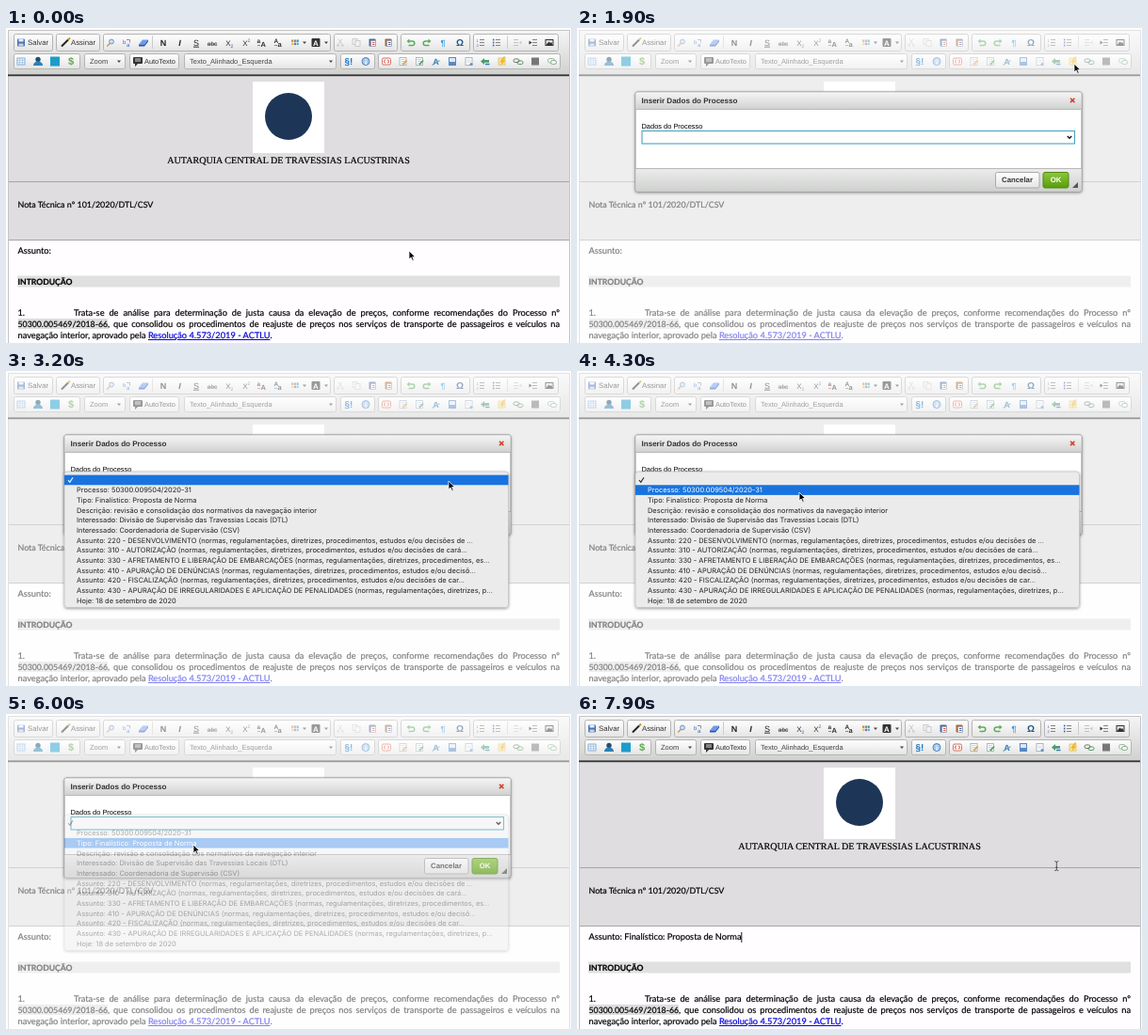
Animation of 600x335 px, one loop 8 s. Source, as an HTML page:

```html
<!DOCTYPE html>
<html lang="pt-BR">
<head>
<meta charset="utf-8">
<title>Editor de documentos</title>
<style>
html, body { margin: 0; width: 100%; height: 100%; overflow: hidden; background: #fff; }
svg { display: block; width: 600px; height: 335px; font-family: "Liberation Sans", Arial, sans-serif; text-rendering: geometricPrecision; }
.doc, .para { font-family: Lato, Calibri, sans-serif; font-size: 9.25px; }
.doc, .serif { stroke: #000; stroke-width: .2px; }
.serif { font-family: "Liberation Serif", "Times New Roman", serif; }
.option { font-family: Inter, sans-serif; }
.para { position: relative; color: #000; line-height: 12px; white-space: nowrap; -webkit-text-stroke: .2px; }
.para div { height: 12px; }
.full { text-align: justify; text-align-last: justify; }
.first { padding-left: 59.5px; }
.num { position: absolute; left: 0; top: 0; }
.ref { font-size: 8.75px; background: #ddd; }
.link { color: #0000e0; text-decoration: underline; }
</style>
</head>
<body>
<svg id="stage" viewBox="0 0 600 335" xmlns="http://www.w3.org/2000/svg">
  <defs>
    <linearGradient id="bar" x2="0" y2="1"><stop stop-color="#f5f5f5"/><stop offset="1" stop-color="#cfd1cf"/></linearGradient>
    <linearGradient id="foot" x2="0" y2="1"><stop stop-color="#ebebeb"/><stop offset="1" stop-color="#cfd1cf"/></linearGradient>
    <linearGradient id="btn" x2="0" y2="1"><stop stop-color="#fff"/><stop offset="1" stop-color="#e4e4e4"/></linearGradient>
    <linearGradient id="go" x2="0" y2="1"><stop stop-color="#8ec63c"/><stop offset="1" stop-color="#579e0b"/></linearGradient>
    <filter id="soft" x="-5%" y="-15%" width="110%" height="135%"><feDropShadow dx="0" dy="1" stdDeviation="1.5" flood-opacity=".4"/></filter>
  </defs>
  <g id="page"></g>
  <rect id="veil" width="600" height="335" fill="#fff" opacity=".5"/>
  <g id="dialog"></g>
  <g id="popup"></g>
  <g id="cursor"></g>
</svg>
<script>
const LOOP = 8000;
const DIALOG_OPEN = 1500, LIST_OPEN = 2800, LIST_FADE = 5850, FADE = 240;
const CHOSEN = 6100, PRESS = 7000, DIALOG_CLOSE = 7350;
const ROW_TOP = 110.6, ROW = 10.65;

const $ = id => document.getElementById(id);
const rect = (x, y, w, h, fill, more = '') => `<rect x="${x}" y="${y}" width="${w}" height="${h}" fill="${fill}" ${more}/>`;
const text = (x, y, size, str, more = '') => `<text x="${x}" y="${y}" font-size="${size}" ${more}>${str}</text>`;
const path = (d, stroke, width = 1, more = '') => `<path d="${d}" fill="none" stroke="${stroke}" stroke-width="${width}" ${more}/>`;
const shape = (d, fill) => `<path d="${d}" fill="${fill}"/>`;
const dot = (x, y, r, fill) => `<circle cx="${x}" cy="${y}" r="${r}" fill="${fill}"/>`;
const at = (x, y, body) => `<g transform="translate(${x} ${y})">${body}</g>`;
const box = (x, y, w, h = 18) => rect(x + .5, y + .5, w, h, 'url(#btn)', 'rx="2" stroke="#b4b4b4"');
const down = (x, y) => shape(`M${x - 2} ${y - 1}h4l-2 2.6z`, '#474747');
const mid = 'text-anchor="middle"', bold = 'font-weight="700"';

// Icons are drawn around their own centre.
const glyph = (str, fill = '#333', size = 9, more = '') => text(0, 3.2, size, str, `${mid} fill="${fill}" ${more}`);
const sheet = (accent, edge = '#9ab') => rect(-3.5, -4, 7, 8, '#fff', `stroke="${edge}" stroke-width=".8"`)
  + path('M-2-2h4M-2 0h4M-2 2h3', '#abc', .7) + path('M0 3.4L4-1', accent, 1.8);
const lines = (c, x = -1) => path(`M${x}-3H4M${x} 0H4M${x} 3H4`, c, .9);
const turn = path('M-2.5-1.5H1.5a2.3 2.3 0 0 1 0 4.6H-2.5', '#5cab5f', 1.5) + shape('M-4.5-1.5l3-2.6v5.2z', '#5cab5f');
const lens = path('M-.8 1L-3.8 4.1', '#c59a5a', 1.5) + `<circle cx="1" cy="-1" r="2.4" fill="#c9e2fa" stroke="#6f92c4"/>`;
const mirror = body => `<g transform="scale(-1 1)">${body}</g>`;
const letters = (a, b, c) => text(-4.5, 0, 6.5, a, `fill="#333" ${bold}`) + text(-.5, 4, 7.5, b, `fill="#333" ${bold}`) + path('M-4 3H-1', c, 1.1);
const indent = (c, head) => mirror(lines(c, -1)) + shape('M4.5-2v4l-3-2z', head);
const clip = (board, ink) => rect(-3.5, -4, 7, 8, board, 'rx=".8"') + rect(-1.5, -2, 5, 6, '#f7f7f7', 'stroke="#99a" stroke-width=".7"') + path('M0 0h2.5M0 2h2.5', ink, 1);

const topIcons = [
  [111, lens],
  [128, text(-4, 1, 6, 'b', 'fill="#36c"') + text(0, 4.5, 6, 'a', 'fill="#36c"') + path('M0-3h3.5v3', '#777', .8)],
  [146, shape('M-5 2L-1-3H5L1 2z', '#6c9bee') + shape('M-5 2H1v2h-6zM1 2L5-3v2L1 4z', '#2856b4')],
  [167, glyph('N', '#222', 9, bold)],
  [184.5, glyph('I', '#222', 9, `font-style="italic" ${bold}`)],
  [202, glyph('S', '#222', 9, 'text-decoration="underline"')],
  [219, glyph('abc', '#333', 6.5, 'text-decoration="line-through"')],
  [236, glyph('X', '#333', 8) + text(2.5, 5, 5, '2', 'fill="#36a"')],
  [254, glyph('X', '#333', 8) + text(2.5, -1, 5, '2', 'fill="#36a"')],
  [271, letters('a', 'A', '#d66')],
  [289, letters('A', 'a', '#59c')],
  [307, ['#d84', '#5a5', '#48c', '#dc4', '#a5c', '#4bb'].map((c, i) => rect(-4 + i % 3 * 2.8, i < 3 ? -3 : .2, 2.2, 2.4, c)).join('')],
  [329, rect(-4.5, -4.5, 9, 9, '#333', 'rx="1"') + glyph('A', '#fff', 8, bold)],
  [355, path('M-2-4L2 2M2-4L-2 2', '#ccc') + dot(-2.3, 3, 1.3, '#ccc') + dot(2.3, 3, 1.3, '#ccc')],
  [372, rect(-4, -4, 5, 6, '#f2f2f2', 'stroke="#ccc"') + rect(-1, -2, 5, 6, '#f2f2f2', 'stroke="#ccc"')],
  [389, clip('#4d6da8', '#d05a3c')],
  [406, clip('#a96a35', '#3d64b0')],
  [430, turn], [447, mirror(turn)],
  [464, glyph('¶', '#3b9be0', 9, bold)],
  [482, glyph('Ω', '#235285', 10, bold)],
  [504, lines('#777') + text(-4.5, -1, 4, '1', 'fill="#46a"') + text(-4.5, 4.2, 4, '2', 'fill="#46a"')],
  [521, lines('#777') + [-3, 0, 3].map(y => dot(-3.3, y, .9, '#46a')).join('')],
  [543, indent('#bbb', '#ccc')], [560, mirror(indent('#777', '#333'))],
  [577, rect(-4.5, -3.5, 9, 7, '#333', 'rx=".6"') + rect(-3.5, -2.5, 7, 5, '#dde4ea') + shape('M-3.5 2.5l3-3.5 1.6 1.6 1.2-1 1.2 2.9z', '#333')]
];
const lowIcons = [
  [16, rect(-4, -3.5, 8, 7, '#fff', 'stroke="#7aa7d4" stroke-width=".9"') + path('M-4-1.2h8M-4 1.2h8M-1.3-3.5v7M1.4-3.5v7', '#8db6dc', .7)],
  [34, dot(0, -2, 2.7, '#23506e') + shape('M-5 4.5c0-6 10-6 10 0z', '#2c80b6')],
  [52, rect(-5, -5, 10, 10, '#1c9ccb')],
  [69, glyph('$', '#5fa84c', 11, bold)],
  [364, glyph('§!', '#1976c5', 10, bold)],
  [382, `<circle r="4" fill="#a9c8ee" stroke="#4c83bf"/>` + glyph('i', '#fff', 8, bold)],
  [404, rect(-4.5, -3.5, 9, 7, '#fff', 'rx="1.5" stroke="#dc6a5a"') + path('M-1-1.8L-3 0l2 1.8M1-1.8L3 0 1 1.8', '#c94536', 1)],
  [421.5, sheet('#dfa03c')],
  [439, sheet('#4ca553')],
  [456.5, glyph('A', '#3575b8', 9, bold) + path('M-4 4L4-1', '#6ab', 1.3)],
  [474, rect(-3.5, -4, 7, 8, '#dbe8f8', 'stroke="#5789c4"') + rect(-3, .5, 6, 3, '#5789c4')],
  [491.5, rect(-3.5, -4, 7, 8, '#fff', 'stroke="#aab6c4"') + path('M-2-1.5h4M-2 .5h4', '#bcc8d6', .8) + dot(2.5, 3, 1.6, '#6a92c4')],
  [509, shape('M-5 0l4-3.6v2.2H4v2.6H-1v2.4z', '#4b9b70') + path('M0 3h4.5', '#37b', 1.5)],
  [526.5, rect(-3.5, -3.5, 7, 7, '#f7e9a8', 'stroke="#d9bd62" stroke-width=".8"') + shape('M2-5L-2.5 1h2.6l-1.6 4L4-1.2H1.4L4-5z', '#eeb52c')],
  [544, rect(-5, -2.6, 6, 3.6, 'none', 'rx="1.8" stroke="#676"') + rect(-1, -.6, 6, 3.6, 'none', 'rx="1.8" stroke="#5b9a5e"')],
  [562, rect(-4, -4, 8, 8, '#777')],
  [580, rect(-4.5, -3, 7, 4.5, '#f4f8f4', 'rx="2" stroke="#9cb89f"') + rect(-1.5, -1, 6, 4, '#f4f8f4', 'rx="2" stroke="#7fae85"')]
];

function toolbar() {
  const groups = [[8, 41], [53, 46], [103, 241], [348, 67], [419, 73], [496, 90]].map(([x, w]) => box(x, 6, w));
  const second = [[8, 70], [83, 43], [131, 52], [189, 161], [355, 36], [395, 193]].map(([x, w]) => box(x, 27, w, 16));
  return rect(2, 2, 596, 48, 'url(#bar)') + groups.join('') + second.join('')
    + at(16, 15.5, rect(-4, -4, 8, 8, '#4774b8', 'rx="1"') + rect(-2.5, -4, 5, 3, '#e8eef8') + rect(-2.5, 1, 5, 3, '#ccd'))
    + at(63, 15.5, path('M-4 4L3-3', '#222', 2) + path('M3-3l2-2', '#b90', 1.8))
    + text(23, 18.3, 7.8, 'Salvar', 'fill="#333"') + text(69, 18.3, 7.8, 'Assinar', 'fill="#333"')
    + topIcons.map(([x, b]) => at(x, 15.5, b)).join('') + down(317, 15.5) + down(340, 15.5)
    + lowIcons.map(([x, b]) => at(x, 35.5, b)).join('')
    + path('M155.5 8v14M532.5 8v14', '#ccc')
    + text(89, 38.3, 7.5, 'Zoom', 'fill="#444"') + down(120, 35.5)
    + at(140, 35, rect(-5, -4, 10, 7, '#333', 'rx="1"') + shape('M-3 2v4l4-4z', '#333') + path('M-3-2h6M-3 0h6', '#fff', .8))
    + text(147, 38.3, 7.4, 'AutoTexto', 'fill="#333"')
    + text(195, 38.3, 7.5, 'Texto_Alinhado_Esquerda', 'fill="#444"') + down(345, 35.5);
}

$('page').innerHTML = rect(0, 0, 600, 335, '#fffdff') + toolbar()
  + rect(2, 51, 596, 174, '#dfdde0') + path('M2 163.5H598M2 225.5H598', '#a5a5a5')
  + path('M2.5 335V2.5H598.5V335', '#c4c4c4') + rect(2, 49.4, 596, 1.8, '#333')
  + rect(262, 57, 76, 76, '#fff') + dot(300, 94, 25, '#1d3557')
  + text(300, 144, 10.1, 'AUTARQUIA CENTRAL DE TRAVESSIAS LACUSTRINAS', `class="serif" ${mid}`)
  + `<g class="doc">${text(12.5, 190.7, 8.9, 'Nota Técnica nº 101/2020/DTL/CSV')}
    <text id="subject" x="12.5" y="240.2"></text>`
  + rect(12, 263.5, 576, 12, '#e0e0e0', 'stroke="none"')
  + text(12.5, 272.5, 8.6, 'INTRODUÇÃO', bold) + '</g>'
  + path('M174.8 232V243', '#000', .9, 'id="caret"')
  + `<foreignObject x="12.5" y="296.6" width="575.5" height="39"><div xmlns="http://www.w3.org/1999/xhtml" class="para">
    <span class="num">1.</span>
    <div class="full first">Trata-se de análise para determinação de justa causa da elevação de preços, conforme recomendações do Processo nº</div>
    <div class="full"><span class="ref">50300.005469/2018-66</span>, que consolidou os procedimentos de reajuste de preços nos serviços de transporte de passageiros e veículos na</div>
    <div>navegação interior, aprovado pela <span class="link">Resolução 4.573/2019 - ACTLU</span>.</div>
  </div></foreignObject>`;

$('dialog').innerHTML = rect(62, 68, 474, 106, '#fff', 'rx="2" stroke="#8d8d8d" filter="url(#soft)"')
  + rect(62.5, 68.5, 473, 18, 'url(#bar)') + path('M62 86.5H536M62 149.5H536', '#b8b8b8')
  + text(68.5, 80.3, 8.05, 'Inserir Dados do Processo', `${bold} fill="#333"`)
  + path('M524 74.7l4.4 4.4M528.4 74.7l-4.4 4.4', '#d5402b', 1.6)
  + text(68.5, 106.8, 7.45, 'Dados do Processo')
  + rect(69, 109.5, 459.5, 13.5, '#fff', 'stroke="#4aa3c0" stroke-width="1.1"')
  + text(75, 118.8, 7.5, '', 'id="value"') + path('M520.8 115l2.2 2.3 2.2-2.3', '#111', 1.4)
  + rect(62.5, 150, 473, 23.5, 'url(#foot)')
  + rect(444.5, 153.5, 46.5, 16.5, 'url(#btn)', 'rx="2" stroke="#a9a9a9"')
  + text(467.5, 164.4, 7.8, 'Cancelar', `${mid} ${bold} fill="#333"`)
  + rect(495, 153.5, 27, 16.5, 'url(#go)', 'id="ok" rx="2" stroke="#4f8a12"')
  + text(508.5, 164.4, 7.8, 'OK', `${mid} ${bold} fill="#fff"`)
  + shape('M532 164v6h-6z', '#555');

const topic = (name, end) => `Assunto: ${name} (normas, regulamentações, diretrizes, ${end}...`;
const options = ['', 'Processo: 50300.009504/2020-31', 'Tipo: Finalístico: Proposta de Norma',
  'Descrição: revisão e consolidação dos normativos da navegação interior',
  'Interessado: Divisão de Supervisão das Travessias Locais (DTL)',
  'Interessado: Coordenadoria de Supervisão (CSV)',
  topic('220 - DESENVOLVIMENTO', 'procedimentos, estudos e/ou decisões de '),
  topic('310 - AUTORIZAÇÃO', 'procedimentos, estudos e/ou decisões de cará'),
  topic('330 - AFRETAMENTO E LIBERAÇÃO DE EMBARCAÇÕES', 'procedimentos, es'),
  topic('410 - APURAÇÃO DE DENÚNCIAS', 'procedimentos, estudos e/ou decisõ'),
  topic('420 - FISCALIZAÇÃO', 'procedimentos, estudos e/ou decisões de car'),
  topic('430 - APURAÇÃO DE IRREGULARIDADES E APLICAÇÃO DE PENALIDADES', 'p'),
  'Hoje: 18 de setembro de 2020'];

$('popup').innerHTML = rect(62, 107, 471.5, 144.5, '#ebebeb', 'rx="3" stroke="#bebebe" stroke-width=".7" filter="url(#soft)"')
  + rect(62, 0, 471.5, ROW, '#1873df', 'id="mark"')
  + path('M66 116l1.8 2.3 3.2-5', '#222', 1.1, 'id="check"')
  + options.map((o, i) => text(75, ROW_TOP + ROW * i + 8.2, 7.45, o, 'class="option"')).join('');
const optionNodes = [...document.querySelectorAll('.option')];

const pointers = {
  arrow: `<path d="M0 0V9l2.1-2 1.6 3.4 1.5-.7-1.5-3.2h2.9z" fill="#000" stroke="#fff" stroke-width=".8"/>`,
  hand: `<path d="M-.9-.5q.9-1 1.8 0V3.2l3.2.8q1.2.5.8 2.2L4.2 9H-.7L-3.6 5.2q.3-1.3 1.6-.4l1.1.8z" fill="#fff" stroke="#000" stroke-width=".9"/>`,
  beam: path('M-2-5q2 0 2 1.3Q0-5 2-5M0-3.7V3.7M-2 5q2 0 2-1.3Q0 5 2 5M-1 1.5H1', '#333', .8)
};
const track = [[0, 428, 237], [300, 428, 237], [1200, 528, 38], [1900, 528, 38], [2600, 470, 117], [3300, 470, 117],
  [4100, 236, 129], [4500, 236, 129], [5200, 199, 139], [6150, 199, 139], [6900, 508, 162], [7350, 508, 162], [7800, 509.3, 161.6], [LOOP, 509.3, 161.6]];

function pointerAt(t) {
  const i = track.findIndex(k => k[0] > t);
  const [t0, x0, y0] = track[i - 1], [t1, x1, y1] = track[i];
  const u = (t - t0) / (t1 - t0), e = u * u * (3 - 2 * u);
  return [x0 + (x1 - x0) * e, y0 + (y1 - y0) * e];
}

const show = (id, on) => $(id).setAttribute('display', on ? 'inline' : 'none');

function render(t) {
  const [x, y] = pointerAt(t);
  const open = t >= DIALOG_OPEN && t < DIALOG_CLOSE;
  const done = t >= DIALOG_CLOSE;
  show('veil', open);
  show('dialog', open);
  show('caret', done);
  $('subject').textContent = done ? 'Assunto: Finalístico: Proposta de Norma' : 'Assunto:';
  $('value').textContent = t >= CHOSEN ? options[2] : '';
  $('ok').setAttribute('fill', t >= PRESS ? '#4c8c0c' : 'url(#go)');

  show('popup', t >= LIST_OPEN && t < LIST_FADE + FADE);
  $('popup').setAttribute('opacity', Math.max(0, Math.min(1, 1 - (t - LIST_FADE) / FADE)));
  const row = Math.max(0, Math.min(options.length - 1, Math.floor((y - ROW_TOP) / ROW)));
  $('mark').setAttribute('y', ROW_TOP + ROW * row);
  $('check').setAttribute('stroke', row ? '#222' : '#fff');
  optionNodes.forEach((node, i) => node.setAttribute('fill', i === row ? '#fff' : '#222'));

  const overOk = open && x > 495 && y > 153;
  $('cursor').innerHTML = at(x, y, pointers[done ? 'beam' : overOk ? 'hand' : 'arrow']);
}

const start = performance.now();
function tick(now) {
  render(Math.max(0, now - start) % LOOP);
  requestAnimationFrame(tick);
}
render(0);
requestAnimationFrame(tick);
</script>
</body>
</html>
```
